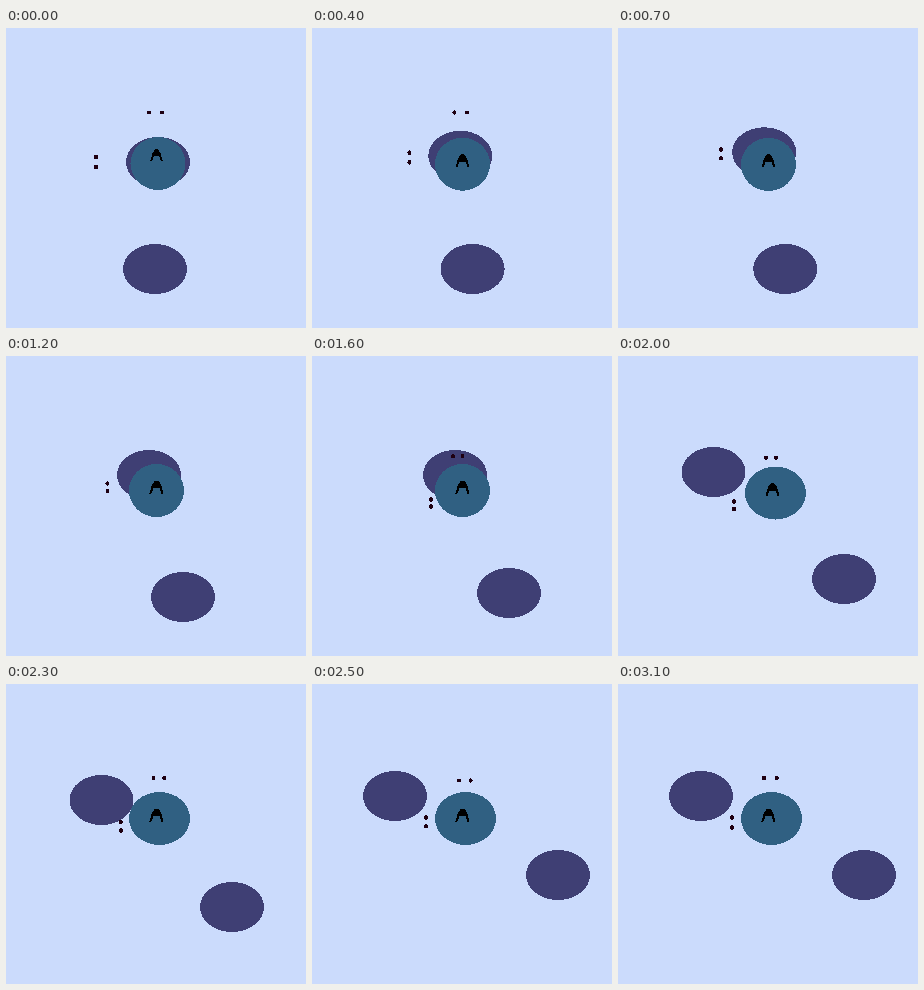
An HTML page for the animation above (3.2 s loop, 300x300 px).

```html
<!DOCTYPE html>
<html lang="en">
<head>
<meta charset="utf-8">
<title>Drifting ovals</title>
<style>
  html, body { margin: 0; width: 100%; height: 100%; overflow: hidden; background: #cbdbfc; }
  svg { display: block; width: 100%; height: 100%; shape-rendering: crispEdges; }
</style>
</head>
<body>
<svg viewBox="0 0 300 300">
  <g fill="#3f3f74">
    <ellipse id="upper" rx="32" ry="25"/>
    <ellipse id="lower" rx="32" ry="25"/>
  </g>
  <ellipse id="head" ry="26.5" fill="#306082"/>
  <path id="nose" d="M-1.5-7H1.5L4.5-3L7 6H5L3 .5H-3L-5 6H-7L-4.5-3Z"/>
  <g fill="#1e0012">
    <g id="side"><ellipse rx="2" ry="2.3"/><ellipse rx="2" ry="2.3"/></g>
    <g id="top"><ellipse rx="2" ry="2.1"/><ellipse rx="2" ry="2.1"/></g>
  </g>
</svg>
<script>
const LOOP = 3200, STEP = 100;
const $ = id => document.getElementById(id);

// Progress from 0 to 1 between two times, and a hard switch from 0 to 1.
const ramp = (t, from, to) => Math.min(1, Math.max(0, (t - from) / (to - from)));
const after = (t, start) => t >= start ? 1 : 0;

// The side dots wander through these points: time, x, y.
const walk = [[0, 90, 129], [700, 103, 121.5], [1200, 101.5, 127.5],
              [1600, 119, 143.5], [2000, 116, 145.5], [2500, 114, 133.5]];

function walkAt(t) {
  let [, x, y] = walk[0];
  for (let i = 1; i < walk.length; i++) {
    const [start, x0, y0] = walk[i - 1], [end, x1, y1] = walk[i];
    const part = ramp(t, start, end);
    x += (x1 - x0) * part;
    y += (y1 - y0) * part;
  }
  return [x, y];
}

function place(node, x, y, scale = 1) {
  node.setAttribute("transform", `translate(${x} ${y}) scale(${scale})`);
}

function placePair(id, x, y, dx, dy) {
  const [first, second] = $(id).children;
  place(first, x, y);
  place(second, x + dx, y + dy);
}

function drawOvals(t) {
  const drift = ramp(t, 0, 1200) ** 0.8;
  const jump = after(t, 1900), hop = after(t, 2500);
  place($("upper"), 152 - 9 * drift - 47.5 * jump - 12.5 * hop,
                    134 - 15 * drift - 3 * jump - 4 * hop);

  const nudge = after(t, 1600), leap = after(t, 1800);
  place($("lower"), 149 + 28 * drift + 20 * nudge + 29 * leap + 20 * hop,
                    241 - 4 * nudge - 14 * leap - 32 * hop);
}

function drawHead(t) {
  const intro = 1 - ramp(t, 0, 400);
  const wide = after(t, 1900);
  const recoil = wide * (1 - ramp(t, 1900, 2100));
  const x = 150.5 + 8 * recoil;
  const y = 134.5 + 5 * recoil + intro + 2 * Math.sin(Math.PI * ramp(t, 0, 1200));
  place($("head"), x + 3 * wide + 1.5 * intro, y);
  $("head").setAttribute("rx", 27.5 + 3 * wide);
  place($("nose"), x, y - 3 - 5 * intro, 1 - 0.13 * intro);
}

function drawDots(t) {
  const pulse = Math.cos(2 * Math.PI * t / LOOP);
  placePair("side", ...walkAt(t), 0, 8.5 + 1.5 * pulse);

  const bob = 18 * Math.sqrt(Math.abs(Math.sin(Math.PI * ramp(t, 1300, 2400))));
  const settle = after(t, 2500) * (12 - 2.5 * ramp(t, 2500, 3000));
  const x = 143 - 2 * ramp(t, 0, 1600) + 7 * ramp(t, 1600, 2000) - 2 * ramp(t, 2000, 3000);
  placePair("top", x, 84.5 + bob + settle, 11.2 + 1.8 * pulse, 0);
  $("top").setAttribute("visibility", t >= 700 && t < 1300 ? "hidden" : "visible");
}

function tick() {
  const t = Math.floor(performance.now() % LOOP / STEP) * STEP;
  drawOvals(t);
  drawHead(t);
  drawDots(t);
  requestAnimationFrame(tick);
}
tick();
</script>
</body>
</html>
```
